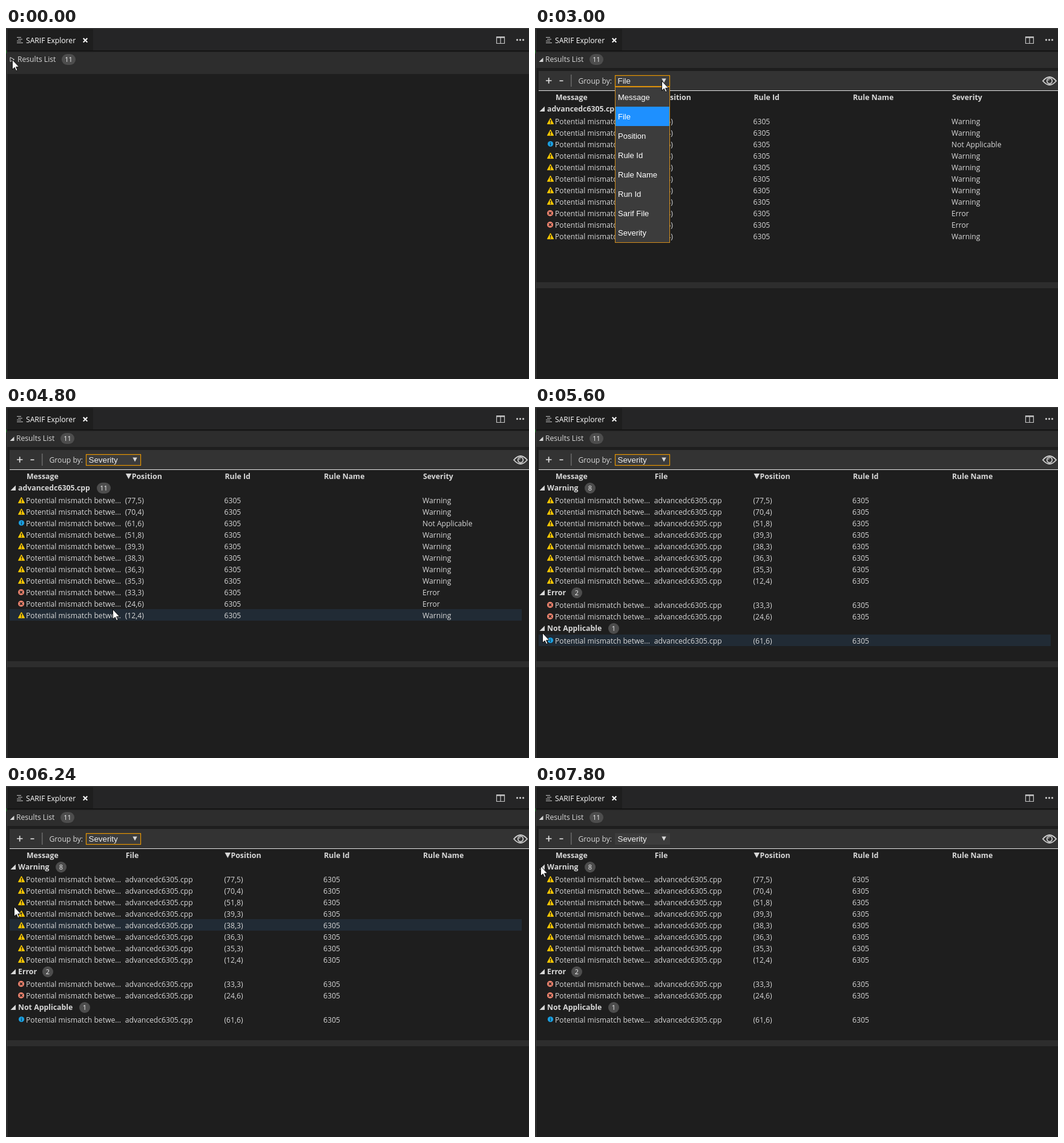
These frames come from a looping animation (864x580 px, 8000 ms). An HTML page:

```html
<!DOCTYPE html>
<html lang="en">
<head>
<meta charset="utf-8">
<title>Results list</title>
<style>
  html, body { margin: 0; width: 100%; height: 100%; overflow: hidden; background: #1e1e1e; }
  svg { display: block; width: 864px; height: 580px; }
  text { font: 12.15px "Open Sans", "Noto Sans", sans-serif; fill: #d8d8d8; white-space: pre; }
  .bold { font-weight: 700; font-size: 12.3px; }
  .tab { fill: #fff; }
  .count { font-size: 11px; fill: #f2f2f2; text-anchor: middle; }
  .field { font: 13.33px "Liberation Sans", Arial, sans-serif; fill: #f0f0f0; }
  .option { font: 13px "Liberation Sans", Arial, sans-serif; fill: #fff; }
</style>
</head>
<body>
<svg id="stage" viewBox="0 0 864 580"></svg>
<script>
const NS = "http://www.w3.org/2000/svg";
const stage = document.getElementById("stage");

function add(parent, tag, attrs, content) {
  const el = document.createElementNS(NS, tag);
  for (const key in attrs) el.setAttribute(key, attrs[key]);
  if (content !== undefined) el.textContent = content;
  parent.appendChild(el);
  return el;
}
const group = parent => add(parent, "g", {});
const rect = (p, x, y, width, height, fill) => add(p, "rect", { x, y, width, height, fill });
const path = (p, d, attrs) => add(p, "path", { d, ...attrs });
const circle = (p, cx, cy, r, fill) => add(p, "circle", { cx, cy, r, fill });
const label = (p, x, y, content, cls = "") => add(p, "text", { x, y, class: cls }, content);
const stroke = (color, width) => ({ fill: "none", stroke: color, "stroke-width": width });
const show = (el, on) => el.setAttribute("display", on ? "inline" : "none");

function badge(p, cx, cy, count) {
  const w = String(count).length > 1 ? 23 : 18;
  add(p, "rect", { x: cx - w / 2, y: cy - 9, width: w, height: 18, rx: 9, fill: "#4d4d4d" });
  label(p, cx, cy + 4, count, "count");
}

// Window chrome
function chrome(p) {
  rect(p, 0, 0, 864, 580, "#1e1e1e");
  rect(p, 2, 2, 862, 36, "#252526");
  rect(p, 2, 2, 142, 36, "#1e1e1e");
  rect(p, 2, 38, 862, 28, "#2d2d2d");
  rect(p, 2, 37, 862, 1, "#121212");
  rect(p, 2, 38, 862, 1, "#191919");
  rect(p, 2, 39, 862, 1, "#242424");
  rect(p, 0, 0, 864, 1.5, "#3a3a3a");
  rect(p, 1, 0, 1, 580, "#3f3f3f");
  rect(p, 0, 37, 1, 5, "#0d6b12");
  path(p, "M18 15.5H25M20 18.5H27M18 21.5H25M18 24.5H28", stroke("#c5c5c5", 1.2));
  label(p, 33, 25, "SARIF Explorer", "tab");
  path(p, "M127.7 17l6.6 6.6M134.3 17l-6.6 6.6", stroke("#fff", 2));
  path(p, "M810.5 14.5h13v11h-13zM817 15v10", stroke("#c5c5c5", 1.2));
  rect(p, 810, 14, 14, 2.5, "#c5c5c5");
  for (const x of [844.5, 849.5, 854.5]) circle(p, x, 19.7, 1.6, "#c5c5c5");
}

function toolbar(p) {
  rect(p, 6, 71, 858, 32, "#333");
  rect(p, 6, 103, 858, 1, "#e4e4e4");
  path(p, "M18 87H27.5M22.7 82.3V91.7", stroke("#e0e0e0", 1.7));
  path(p, "M40.5 87.3H46.5", stroke("#e0e0e0", 1.6));
  rect(p, 59, 77, 1.5, 20, "#6a6a6a");
  label(p, 71.5, 92, "Group by:");
  rect(p, 132, 78, 91, 19, "#3c3c3c");
  path(p, "M209.3 83.5h7.4l-3.7 7z", { fill: "#d8d8d8" });
  path(p, "M839 87.5Q850 74.5 861 87.5Q850 100.5 839 87.5Z", stroke("#d0d0d0", 1.8));
  add(p, "circle", { cx: 850, cy: 87.5, r: 4.3, ...stroke("#d0d0d0", 1.7) });
  path(p, "M847.7 87.5a2.3 2.3 0 0 1 2.3 -2.3", stroke("#d0d0d0", 1));
}

// Result tables
const RESULTS = [
  ["(77,5)", "Warning"], ["(70,4)", "Warning"], ["(61,6)", "Not Applicable"],
  ["(51,8)", "Warning"], ["(39,3)", "Warning"], ["(38,3)", "Warning"],
  ["(36,3)", "Warning"], ["(35,3)", "Warning"], ["(33,3)", "Error"],
  ["(24,6)", "Error"], ["(12,4)", "Warning"]
].map(([position, severity]) => ({ position, severity }));
const FILE = "advancedc6305.cpp";
const columnX = i => 33 + i * 163.75;

const icons = {
  Warning(p, y) {
    path(p, `M25.5 ${y - 4.8}L30.6 ${y + 4.6}H20.4Z`,
      { fill: "#fc0", stroke: "#fc0", "stroke-width": 1, "stroke-linejoin": "round" });
    rect(p, 24.8, y - 2.3, 1.5, 3.8, "#1e1e1e");
    rect(p, 24.8, y + 2.4, 1.5, 1.5, "#1e1e1e");
  },
  Error(p, y) {
    circle(p, 25, y, 5, "#f48771");
    path(p, `M22.8 ${y - 2.2}l4.4 4.4M27.2 ${y - 2.2}l-4.4 4.4`, stroke("#1e1e1e", 1.5));
  },
  "Not Applicable"(p, y) {
    circle(p, 25.5, y - .5, 4.6, "#1ba1e2");
    rect(p, 24.9, y - 3.2, 1.2, 1.2, "#12384c");
    rect(p, 24.9, y - 1.4, 1.2, 3.8, "#12384c");
  }
};

function table(heads, groups, cells) {
  const el = group(stage);
  const hover = rect(el, 6, 0, 846, 19, "#212b35");
  const rows = [];
  heads.forEach((name, i) => {
    const x = columnX(i) + 1, sorted = name === "Position";
    if (sorted) path(el, `M${x} 110h9.6l-4.8 9z`, { fill: "#d8d8d8" });
    label(el, x + (sorted ? 10 : 0), 119, name, "bold");
  });
  let y = 133;
  for (const { name, badgeX, items, closed } of groups) {
    const shift = closed ? 2 : 0;
    if (closed) path(el, `M9 ${y - 4}v9l6.5 -4.5z`, stroke("#d8d8d8", 1));
    else path(el, `M7.5 ${y + 5}h8.5v-8.5z`, { fill: "#d8d8d8" });
    label(el, 20 + shift, y + 5, name, "bold");
    badge(el, badgeX + shift, y + 1, items.length);
    y += 21;
    if (closed) continue;
    for (const item of items) {
      rows.push(y);
      icons[item.severity](el, y);
      cells(item).forEach((value, i) => label(el, columnX(i), y + 5, value));
      y += 19;
    }
  }
  return { el, hover, rows };
}

const MESSAGE = "Potential mismatch betwe...";
const bySeverity = closedName => table(
  ["Message", "File", "Position", "Rule Id", "Rule Name"],
  [["Warning", 91], ["Error", 69], ["Not Applicable", 130]].map(([name, badgeX]) => ({
    name, badgeX, closed: name === closedName,
    items: RESULTS.filter(r => r.severity === name)
  })),
  r => [MESSAGE, FILE, r.position, "6305"]);

// Build the scene, back to front
chrome(stage);

const folded = group(stage);
rect(folded, 2, 66, 862, 10, "#2d2d2d");
path(folded, "M7 48.5v7l6.5 -3.5z", stroke("#d8d8d8", 1));
label(folded, 19, 56, "Results List");
badge(folded, 103.5, 52, 11);

const opened = group(stage);
path(opened, "M6.5 56h7v-7z", { fill: "#d8d8d8" });
label(opened, 17, 56, "Results List");
badge(opened, 101.5, 52, 11);
rect(opened, 2, 420, 862, 10, "#2d2d2d");
toolbar(opened);
const field = label(opened, 136.5, 92, "File", "field");
const focusRing = add(opened, "rect",
  { x: 132.5, y: 78.5, width: 90, height: 18, ...stroke("#e59400", 1.2) });

const tables = {
  file: table(["Message", "Position", "Rule Id", "Rule Name", "Severity"],
    [{ name: FILE, badgeX: 161.5, items: RESULTS }],
    r => [MESSAGE, r.position, "6305", "", r.severity]),
  severity: bySeverity(),
  collapsed: bySeverity("Warning")
};

const popup = group(stage);
add(popup, "rect", { x: 132.5, y: 97.5, width: 90, height: 257, fill: "#3c3c3c", stroke: "#d08c1c" });
const choice = rect(popup, 133, 98, 89, 32, "#1e90ff");
["Message", "File", "Position", "Rule Id", "Rule Name", "Run Id", "Sarif File", "Severity"]
  .forEach((name, i) => label(popup, 137, 119 + i * 32, name, "option"));

const cursor = path(stage, "M.5 .5V16.6L4.2 13.2L6.7 18.7L9 17.7L6.6 12.3H11.6Z",
  { fill: "#fff", stroke: "#000", "stroke-width": .9 });

// Pointer track: time, x, y
const TRACK = [
  [0, 10, 52], [80, 10, 50], [1360, 10, 50], [1400, 52, 47], [1480, 95, 46],
  [1600, 140, 52], [1760, 178, 65], [1920, 200, 76], [2120, 211, 84],
  [2720, 211, 84], [2760, 211, 85], [2960, 211, 85], [3000, 209, 87],
  [3200, 203, 120], [3400, 196, 196], [3600, 188, 270], [3700, 184, 296],
  [3800, 183, 302], [3880, 183, 302], [4280, 176, 334], [4960, 176, 334],
  [5000, 172, 338], [5200, 120, 395], [5320, 75, 416], [5440, 36, 408],
  [5600, 12, 373], [5800, 12, 333], [6040, 13, 262], [6240, 13, 199],
  [6440, 11, 156], [6540, 10, 143], [6640, 10, 141], [6960, 9, 132], [8000, 9, 132]
];

function pointer(t) {
  const i = Math.max(1, TRACK.findIndex(k => k[0] >= t));
  const [t0, x0, y0] = TRACK[i - 1], [t1, x1, y1] = TRACK[i];
  const f = (t - t0) / (t1 - t0);
  return { x: Math.round(x0 + (x1 - x0) * f), y: Math.round(y0 + (y1 - y0) * f) };
}

const LOOP = 8000, STEP = 40, LAG = 80;

function render(t) {
  const { x, y } = pointer(t);
  const hoverY = pointer(Math.max(0, t - LAG)).y;
  cursor.setAttribute("transform", `translate(${x} ${y})`);

  const isOpen = t >= 440;
  show(folded, !isOpen);
  show(opened, isOpen);
  show(focusRing, t >= 2400 && t < 6960);
  field.textContent = t < 4800 ? "File" : "Severity";

  show(popup, t >= 2400 && t < 4800);
  const index = hoverY < 98 ? 1 : Math.min(7, Math.floor((hoverY - 98) / 32));
  choice.setAttribute("y", 98 + index * 32);

  const current = !isOpen ? "" : t < 4840 ? "file"
    : t >= 7120 && t < 7800 ? "collapsed" : "severity";
  for (const name in tables) {
    const { el, hover, rows } = tables[name];
    show(el, name === current);
    const row = rows.find(c => hoverY >= c - 10 && hoverY < c + 9);
    show(hover, t >= 4800 && row !== undefined);
    if (row !== undefined) hover.setAttribute("y", row - 10);
  }
}

const start = performance.now();
function tick() {
  const t = (performance.now() - start) % LOOP;
  render(Math.floor(t / STEP) * STEP);
  requestAnimationFrame(tick);
}
tick();
</script>
</body>
</html>
```
